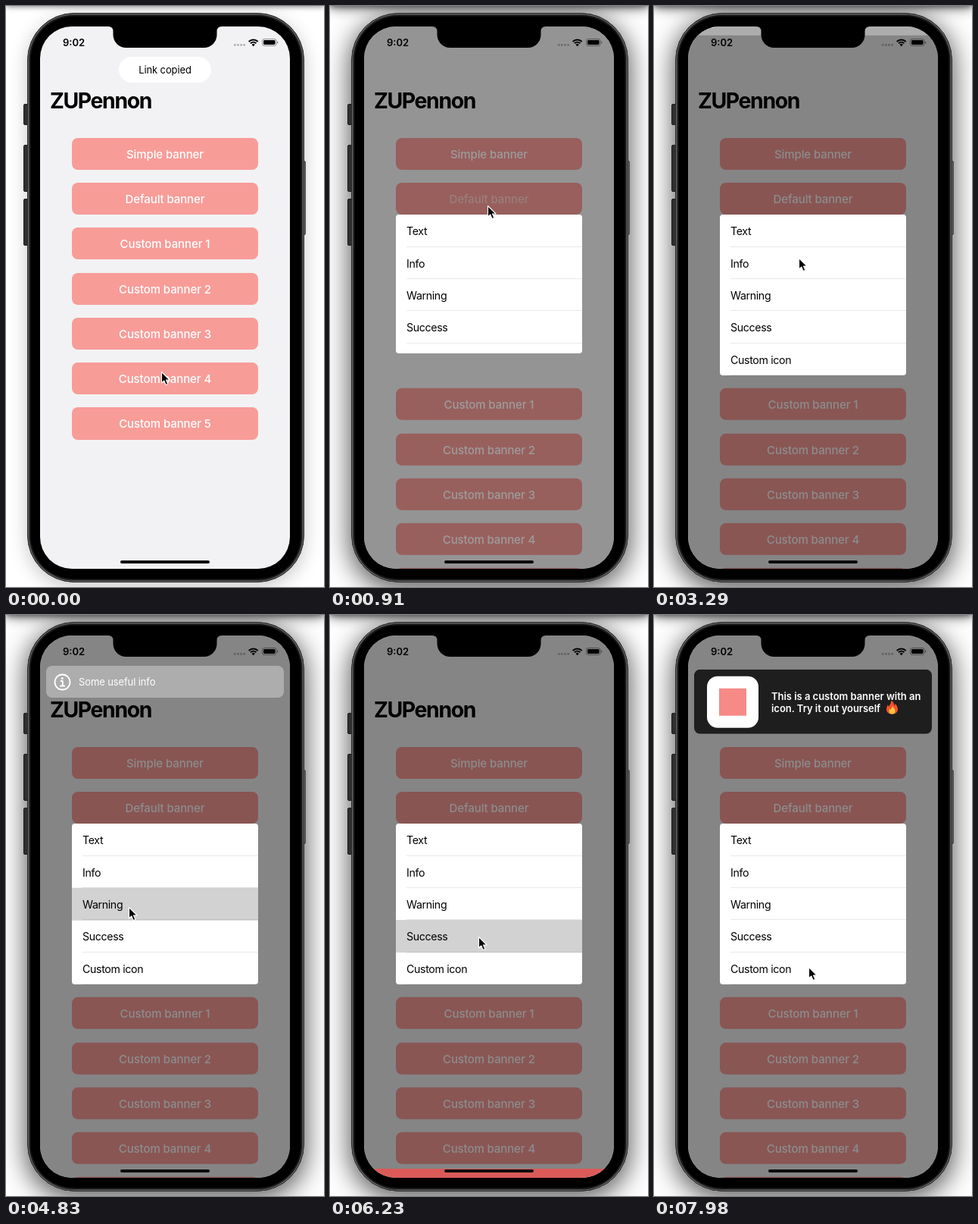
Recreate the animation shown at these times as an HTML page. Size 420x766 px, loop 8 s.

```html
<!DOCTYPE html>
<html lang="en">
<head>
<meta charset="utf-8">
<title>Banner demo</title>
<style>
  :root {
    --spring: linear(0, .05 4%, .198 10%, .537, .81, .969, 1.034, 1.046, 1.034, 1.019, 1.007, 1);
    --spring-start: linear(0, .198 14.29%, .537 28.57%, .81 42.86%, .969 57.14%, 1.034 71.43%, 1.046 85.71%, 1.034);
    --settle: linear(0, .191, .475, .692, .829, .908, .952, .975, .987, .993, 1);
  }
  html, body { margin: 0; width: 100%; height: 100%; overflow: hidden; background: #fff; }
  body, .stage { font-family: Inter, Roboto, "Liberation Sans", sans-serif; }
  .stage { position: absolute; left: 0; top: 0; width: 420px; height: 766px; overflow: hidden; }
  .stage div, .stage svg { position: absolute; box-sizing: border-box; white-space: nowrap; }
  .layer { left: 0; top: 0; width: 420px; height: 766px; }

  /* Phone */
  .shade { left: 28px; top: 9px; width: 366px; height: 751px; border-radius: 62px; }
  .soft { box-shadow: 0 6px 24px rgba(0,0,0,.22); }
  .deep { box-shadow: 0 8px 36px 3px rgba(0,0,0,.5); }
  .edge { left: 0; top: -20px; width: 420px; height: 20px; box-shadow: 0 1px 7px rgba(0,0,0,.5); }
  .active { animation: active 8s step-end infinite; }
  .active .edge { box-shadow: 0 2px 18px rgba(0,0,0,.6); }
  .key { background: #303032; border: 1px solid #1b1b1c; border-radius: 2px; width: 6px; left: 23px; }
  .right { left: 390px; top: 204px; height: 98px; background: #6a6a6c; border-color: #4a4a4b; }
  .body { left: 28px; top: 9px; width: 366px; height: 751px; border-radius: 62px; background: #000;
    border: 1px solid #2a2a2b; box-shadow: inset 0 0 0 1.5px #626264, inset 0 0 0 3.5px #1c1c1d; }
  .screen { left: 45px; top: 27px; width: 330px; height: 715px; border-radius: 42px; overflow: hidden; background: #f2f2f4; }
  .screen > .layer { left: -45px; top: -27px; }

  /* Page */
  .title { left: 58px; top: 106.5px; font: 700 28.4px/36px Inter, Roboto, sans-serif; letter-spacing: -1.4px; color: #000; }
  .btn { left: 87px; top: calc(173.6px + 59.3px * var(--i)); width: 246px; height: 42.3px; border-radius: 8px;
    background: #f89c98; color: #fff; font-size: 15px; font-weight: 500; letter-spacing: -.1px; line-height: 43.6px; text-align: center; }
  .press { display: inline-block; animation: press 8s linear infinite; }
  .moved { animation: moved 8s step-end infinite; }
  .dim { background: #000; opacity: 0; animation: dim 8s var(--settle) infinite; }
  .list { left: 87px; top: 275.3px; width: 246px; height: 0; border-radius: 4px; overflow: hidden; background: #fff;
    animation: open 8s var(--settle) infinite; }
  .row { left: 14px; top: calc(42.35px * var(--i)); width: 232px; height: 42.35px; border-bottom: 1px solid rgba(60,60,67,.11);
    font-size: 14.2px; line-height: 43px; letter-spacing: -.35px; color: #000; z-index: 1; }
  .mark { left: 0; top: -.6px; width: 246px; height: 43px; background: #d2d2d2; opacity: 0;
    animation: mark 8s step-end infinite; }

  /* Banners */
  .banner { left: 53px; top: 67px; width: 313.5px; height: 42.3px; border-radius: 8px; color: #fff;
    font-size: 13px; line-height: 42.5px; letter-spacing: -.12px; padding-left: 43px; }
  .banner svg { left: 10px; top: 9.5px; width: 23px; height: 23px; fill: none; stroke: #fff; stroke-width: 1.8;
    stroke-linecap: round; stroke-linejoin: round; }
  .pill { left: 149px; width: 122px; height: 34px; border-radius: 17px; background: #fff; color: #000;
    line-height: 34px; padding: 0; text-align: center; animation: pill 8s linear infinite; }
  .text { background: #fff; color: #000; padding-left: 17.5px; animation: text 8s var(--spring) infinite; }
  .info { background: #adadad; animation: info 8s var(--spring) infinite; }
  .low { top: 671px; }
  .warn { background: #db5a58; animation: warn 8s var(--spring) infinite; }
  .done { background: #5cb577; animation: done 8s var(--spring) infinite; }
  .custom { height: 85px; background: #1e1e1f; animation: custom 8s var(--spring-start) infinite; }
  .custom p { position: absolute; left: 102px; top: 26.5px; margin: 0; font-weight: 600; line-height: 16.4px; letter-spacing: -.03px; }
  .tile { left: 17px; top: 9px; width: 68px; height: 68px; border-radius: 14px; background: #fff; }
  .tile div { left: 16px; top: 16px; width: 36px; height: 36px; background: #f68a87; }
  .banner .flame { left: 253px; top: 41px; width: 17px; height: 18px; stroke: none; }

  .clock { left: 75px; top: 39px; font-size: 13px; font-weight: 600; line-height: 18px; color: #000; }
  .home { left: 151px; top: 730.5px; width: 118px; height: 4.5px; border-radius: 3px; background: #0c0c0c; }
  .cursor { left: 0; top: 0; width: 16px; height: 22px; overflow: visible; animation: cursor 8s ease-in-out infinite; }

  @keyframes active { 0% { opacity: 0 } 8.25%, 100% { opacity: 1 } }
  @keyframes press { 0%, 8.5% { opacity: 1 } 8.7%, 11.4% { opacity: .5 } 14%, 100% { opacity: 1 } }
  @keyframes moved { 0% { transform: none } 9.1%, 100% { transform: translateY(211.8px) } }
  @keyframes dim { 0%, 9.16% { opacity: 0 } 14.16%, 100% { opacity: .45 } }
  @keyframes open { 0%, 9.16% { height: 0 } 14.16%, 100% { height: 211.8px } }
  @keyframes mark {
    0%, 20.6%, 40.6%, 63.3%, 78.4%, 95.2%, 100% { opacity: 0 }
    17.5% { opacity: 1; transform: none }
    37.6% { opacity: 1; transform: translateY(42.35px) }
    60.3% { opacity: 1; transform: translateY(84.7px) }
    76.1% { opacity: 1; transform: translateY(127.05px) }
    94.2% { opacity: 1; transform: translateY(169.4px) }
  }
  /* Banners spring in and leave at constant speed */
  @keyframes pill { 0%, 5.5% { transform: none } 7%, 100% { transform: translateY(-75px) } }
  @keyframes text {
    0%, 20.25% { transform: translateY(-83px) }
    27.75% { transform: translateY(0) }
    39.44% { transform: translateY(0); animation-timing-function: linear }
    40.44%, 100% { transform: translateY(-83px) }
  }
  @keyframes info {
    0%, 40.525% { transform: translateY(-83px) }
    48.025% { transform: translateY(0) }
    62.19% { transform: translateY(0); animation-timing-function: linear }
    63.19%, 100% { transform: translateY(-83px) }
  }
  @keyframes warn {
    0%, 63.25% { transform: translateY(71px) }
    70.75% { transform: translateY(0) }
    77.06% { transform: translateY(0); animation-timing-function: linear }
    78.06%, 100% { transform: translateY(71px) }
  }
  @keyframes done {
    0%, 78.125% { transform: translateY(71px) }
    85.625% { transform: translateY(0) }
    93.69% { transform: translateY(0); animation-timing-function: linear }
    94.69%, 100% { transform: translateY(71px) }
  }
  @keyframes custom {
    0%, 94.75% { transform: translateY(-126px) }
    100% { transform: translateY(0) }
  }
  @keyframes cursor {
    0%, .6% { transform: translate(205px, 482px) }
    8%, 12.5% { transform: translate(208px, 263px) }
    16.5%, 31.2% { transform: translate(206px, 293px) }
    35%, 51.4% { transform: translate(191px, 332px) }
    57.75%, 64% { transform: translate(162px, 385px) }
    70% { transform: translate(186px, 421px) }
    75.5%, 84% { transform: translate(196px, 424px) }
    86.6%, 100% { transform: translate(204px, 464px) }
  }
</style>
</head>
<body>
<div class="stage">
  <div class="edge"></div>
  <div class="shade soft"></div>
  <div class="layer active"><div class="edge"></div><div class="shade deep"></div></div>

  <div class="key" style="top:129px;height:28px"></div>
  <div class="key" style="top:183px;height:62px"></div>
  <div class="key" style="top:254px;height:62px"></div>
  <div class="key right"></div>
  <div class="body"></div>

  <div class="screen"><div class="layer">
    <div class="title">ZUPennon</div>
    <div class="btn" style="--i:0">Simple banner</div>
    <div class="btn" style="--i:1"><span class="press">Default banner</span></div>
    <div class="layer moved">
      <div class="btn" style="--i:2">Custom banner 1</div>
      <div class="btn" style="--i:3">Custom banner 2</div>
      <div class="btn" style="--i:4">Custom banner 3</div>
      <div class="btn" style="--i:5">Custom banner 4</div>
      <div class="btn" style="--i:6">Custom banner 5</div>
    </div>
    <div class="layer dim"></div>

    <div class="list">
      <div class="row" style="--i:0">Text</div>
      <div class="row" style="--i:1">Info</div>
      <div class="row" style="--i:2">Warning</div>
      <div class="row" style="--i:3">Success</div>
      <div class="row" style="--i:4">Custom icon</div>
      <div class="mark"></div>
    </div>

    <div class="banner pill">Link copied</div>
    <div class="banner text">A Banner with just a text</div>
    <div class="banner info">
      <svg viewBox="0 0 23 23"><circle cx="11.5" cy="11.5" r="10"/><path d="M9.5 10h2.3v6.3M9 16.5h5.4"/><circle cx="11.3" cy="6.4" r=".6"/></svg>
      Some useful info
    </div>
    <div class="banner low warn">
      <svg viewBox="0 0 23 23"><path d="M11.5 2.5 21.5 20H1.5ZM11.5 9v5M11.5 17v.1"/></svg>
      This is a warning
    </div>
    <div class="banner low done">
      <svg viewBox="0 0 23 23"><circle cx="11.5" cy="11.5" r="10"/><path d="m7 12 3.2 3.4L16 8"/></svg>
      This is a success
    </div>
    <div class="banner custom">
      <div class="tile"><div></div></div>
      <p>This is a custom banner with an<br>icon. Try it out yourself</p>
      <svg class="flame" viewBox="0 0 17 18">
        <path fill="#f4512c" d="M7 0c4 2 4 5 4.500 6.500.8-.5 1-1.500 1-2.500 2 2 3.500 5 3.500 7.500 0 4-3 6.500-7.500 6.500S1 15.500 1 11.500C1 9 2 7 3 5.500c.3 1 .7 2 1.500 2.500C5 5 8 4 7 0Z"/>
        <path fill="#ffc43d" d="M9 7c.3 2 3.500 3.500 3.500 7 0 2.500-1.800 4-4 4s-4-1.500-4-4c0-1.500.7-2.500 1.300-3.200.3.8.6 1.200 1.200 1.500C7.200 10 8.800 9 9 7Z"/>
      </svg>
    </div>

    <div class="clock">9:02</div>
    <div class="home"></div>
    <svg class="layer" viewBox="0 0 420 766">
      <path d="M135 26v1q6.500 0 6.500 6.500V38a17 17 0 0 0 17 17h103a17 17 0 0 0 17-17v-4.500q0-6.500 6.500-6.500v-1Z"/>
      <path d="M302.300 51.200h14" stroke="#000" stroke-opacity=".27" stroke-width="3" stroke-linecap="round" stroke-dasharray="0 4.100"/>
      <g fill="none" stroke="#000" stroke-width="2.100">
        <path d="M320.700 46.900a8.700 8.700 0 0 1 12 0M323 49.300a5.300 5.300 0 0 1 7.400 0"/>
      </g>
      <path d="m326.700 53.200-2.100-2.300a3 3 0 0 1 4.200 0Z"/>
      <rect x="338.500" y="43.500" width="18.500" height="9" rx="2.600" fill="none" stroke="#000" stroke-opacity=".4"/>
      <rect x="340" y="45" width="15.500" height="6" rx="1.400"/>
      <path d="M358 46.500q1.500.5 1.500 1.500t-1.500 1.500Z" opacity=".45"/>
    </svg>
  </div></div>

  <svg class="cursor" viewBox="0 0 16 22">
    <path d="M.5.500V15l3.300-3 2.300 5.500 2.700-1.100L6.500 11h4.600Z" fill="#000" stroke="#fff" stroke-width="1.100" stroke-linejoin="round"/>
  </svg>
</div>
</body>
</html>
```
